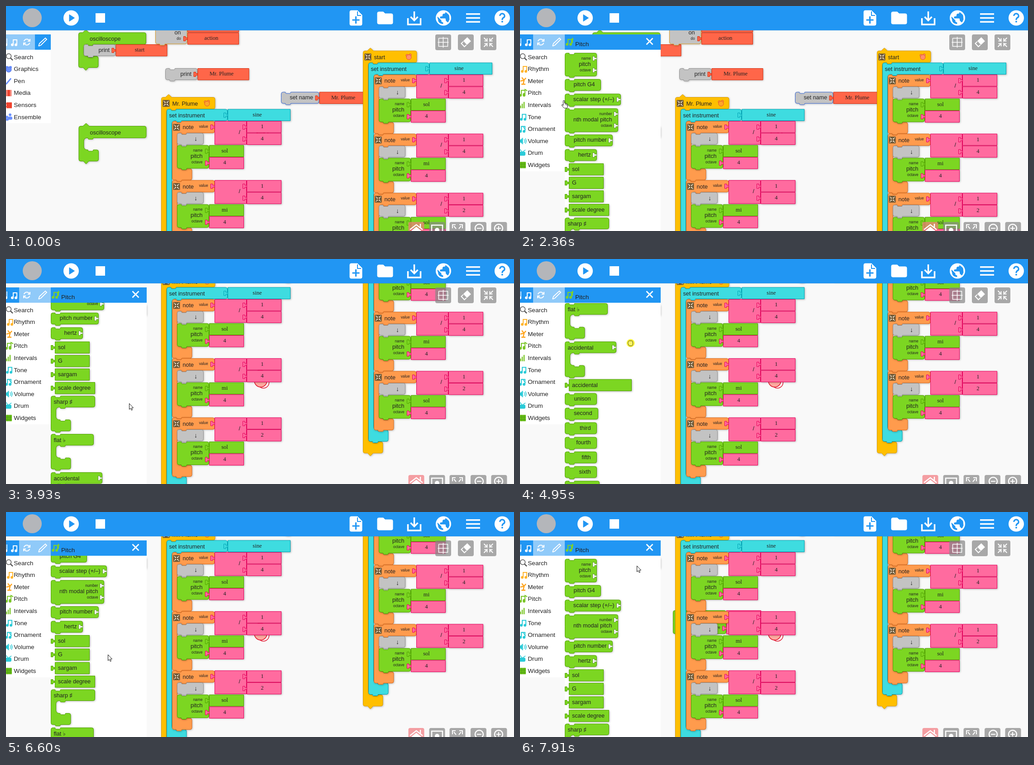
These frames come from a looping animation (1123 by 499 pixels, 7.99 s). An HTML page with a canvas:

```html
<!DOCTYPE html>
<html lang="en">
<head>
<meta charset="utf-8">
<title>Block music editor</title>
<style>
html, body { margin: 0; width: 100%; height: 100%; overflow: hidden; background: #f9f9f9; }
canvas { display: block; width: 1123px; height: 499px; }
</style>
</head>
<body>
<canvas id="stage" width="1123" height="499"></canvas>
<script>
const ctx = document.getElementById('stage').getContext('2d');
const LOOP = 7990, NAME = 'Mr. Plume';
const SANS = '"Liberation Sans", Arial, sans-serif', SERIF = '"Liberation Serif", Times, serif';
const BLUE = '#2196f3', PALE = '#90caf9';
const YELLOW = ['#ffbf00', '#d99c00'], CYAN = ['#3edce0', '#00a3b5'], ORANGE = ['#ff9b4d', '#d96a1c'],
  GREEN = ['#7cd622', '#4fa000'], PINK = ['#ff6b9f', '#e6005c'], RED = ['#ff6649', '#d92e0f'],
  GREY = ['#c3c3c3', '#919191'];

// [first change, last change, number of changes]
const BURSTS = [[230, 1010, 11], [1090, 1810, 10], [1890, 1890, 1], [2050, 2360, 5], [2990, 3060, 2],
  [3230, 3460, 4], [3610, 3930, 5], [4160, 4400, 4], [4630, 5420, 11], [5500, 6280, 11],
  [6350, 7050, 10], [7200, 7910, 10]];
const WORK_SCROLL = [[3153, 0], [3460, 166]];
const MENU_SCROLL = [[3530, 0], [3930, 166], [4080, 166], [4400, 332], [4630, 332], [4946, 456],
  [5100, 468], [5500, 397], [6280, 326], [6583, 76], [6800, 18], [7050, 0]];
const POINTER = [[230, 762, 484, 'arrow'], [500, 500, 330, 'arrow'], [800, 140, 170, 'arrow'],
  [1010, 33, 118, 'hand'], [1330, 15, 80, 'hand'], [1490, 15, 80, 'hand'], [1810, 16, 160, 'hand'],
  [1890, 15, 182, 'hand'], [2050, 17, 188, 'hand'], [2360, 95, 209, 'hand'], [2910, 95, 209, 'hand'],
  [3060, 326, 234, 'arrow'], [3460, 317, 234, 'arrow'], [3610, 314, 240, 'arrow'],
  [3930, 272, 320, 'arrow'], [4400, 272, 320, 'arrow'], [4630, 272, 310, 'fist'],
  [4946, 244, 186, 'fist'], [5100, 243, 174, 'fist'], [5500, 259, 245, 'fist'],
  [6280, 225, 316, 'arrow'], [7120, 225, 316, 'arrow'], [7357, 155, 256, 'fist'],
  [7673, 393, 247, 'arrow'], [7910, 258, 119, 'arrow']];
const TABS_AT = 1400, FLYOUT_AT = 2120, GRAB_AT = 7357, DROP_AT = 7670;

function heldTime(t) {
  const burst = BURSTS.filter(b => b[0] <= t).pop();
  if (!burst) return 0;
  const [start, end, count] = burst;
  if (count === 1) return start;
  const step = (end - start) / (count - 1);
  return start + Math.min(count - 1, Math.floor((t - start) / step + 1e-6)) * step;
}

function track(keys, t, column = 1) {
  const next = keys.findIndex(k => k[0] > t);
  if (next === 0) return keys[0][column];
  if (next < 0) return keys[keys.length - 1][column];
  const a = keys[next - 1], b = keys[next];
  return Math.round(a[column] + (b[column] - a[column]) * (t - a[0]) / (b[0] - a[0]));
}

function rect(x, y, w, h, fill) { ctx.fillStyle = fill; ctx.fillRect(x, y, w, h); }

function disc(x, y, r, fill, stroke) {
  ctx.beginPath();
  ctx.arc(x, y, r, 0, 7);
  if (fill) { ctx.fillStyle = fill; ctx.fill(); }
  if (stroke) { ctx.strokeStyle = stroke; ctx.stroke(); }
}

function roundBox(x, y, w, h, r, fill) {
  ctx.beginPath();
  ctx.roundRect(x, y, w, h, r);
  ctx.fillStyle = fill;
  ctx.fill();
}

function text(s, x, y, { size = 12.6, font = SANS, align = 'left', color = '#222' } = {}) {
  ctx.font = `${size}px ${font}`;
  ctx.textAlign = align;
  ctx.textBaseline = 'middle';
  ctx.fillStyle = color;
  ctx.fillText(s, x, y);
}

const small = (s, x, y) => text(s, x, y, { size: 8.3, align: 'right' });

// Lines in "x,y x,y" form; several strokes are separated by "|"
function lines(x, y, d, color = '#fff', width = 2) {
  ctx.strokeStyle = color;
  ctx.lineWidth = width;
  ctx.beginPath();
  for (const stroke of d.split('|'))
    stroke.split(' ').forEach((p, i) => {
      const [px, py] = p.split(',').map(Number);
      i ? ctx.lineTo(x + px, y + py) : ctx.moveTo(x + px, y + py);
    });
  ctx.stroke();
  ctx.lineWidth = 1;
}

// Polygon of [x, y, corner radius]
function shape(points, [fill, stroke], shadow = true) {
  const last = points[points.length - 1], n = points.length;
  ctx.beginPath();
  ctx.moveTo((last[0] + points[0][0]) / 2, (last[1] + points[0][1]) / 2);
  points.forEach(([x, y, r = 0], i) => {
    const [nx, ny] = points[(i + 1) % n];
    r ? ctx.arcTo(x, y, nx, ny, r) : ctx.lineTo(x, y);
  });
  ctx.closePath();
  ctx.save();
  if (shadow) { ctx.shadowColor = 'rgba(0,0,0,.3)'; ctx.shadowBlur = 4; ctx.shadowOffsetX = ctx.shadowOffsetY = 1; }
  ctx.fillStyle = fill;
  ctx.fill();
  ctx.restore();
  ctx.strokeStyle = stroke;
  ctx.stroke();
}

const topEdge = (x, y, hat) => hat
  ? [[x + 9, y], [x + 16, y - 6.5, 1], [x + 23, y]]
  : [[x + 9, y], [x + 10, y + 3, 1], [x + 20, y + 3, 1], [x + 21, y]];
const bottomEdge = (x, y, tip) => tip
  ? [[x + 22, y], [x + 16, y + 6.5, 1], [x + 10, y]]
  : [[x + 21, y], [x + 20, y + 3, 1], [x + 10, y + 3, 1], [x + 9, y]];

function slab(x, y, w, h, color) {
  shape([[x, y, 4], ...topEdge(x, y), [x + w, y, 4], [x + w, y + h, 4],
    ...bottomEdge(x, y + h), [x, y + h, 4]], color);
}

function clamp(x, y, w, inner, color, { hat = false, head = 26, foot = 25, bar = 11 } = {}) {
  const y1 = y + head, y2 = y1 + inner, y3 = y2 + foot, xi = x + bar;
  shape([[x, y, 4], ...topEdge(x, y, hat), [x + w, y, 4], [x + w, y1, 4],
    ...bottomEdge(xi, y1), [xi, y1, 7], [xi, y2, 7], ...topEdge(xi, y2),
    [x + 43.5, y2, 4], [x + 43.5, y3, 4], ...bottomEdge(x, y3, hat), [x, y3, 4]], color);
}

function plug(x, y, color) {
  shape([[x, y - 2], [x - 4.5, y - 2], [x - 4.5, y - 5], [x - 9, y - 5], [x - 9, y + 5],
    [x - 4.5, y + 5], [x - 4.5, y + 2], [x, y + 2]], color, false);
}

function value(x, y, w, color, label, h = 25.5) {
  plug(x, y + 13, color);
  shape([[x, y], [x + w, y], [x + w, y + h], [x, y + h]], color);
  if (label) text(label, x + w / 2 - 4, y + 12.5, { font: SERIF, align: 'center' });
}

function collapseMark(x, y) {
  rect(x, y, 15, 15, '#6b5533');
  lines(x + 7.5, y + 7.5, '-5.5,-5.5 -1.5,-1.5|5.5,-5.5 1.5,-1.5|-5.5,5.5 -1.5,1.5|5.5,5.5 1.5,1.5', '#f4e8d4', 1.3);
  lines(x + 7.5, y + 7.5, '-1.5,-4 -1.5,-1.5 -4,-1.5|1.5,-4 1.5,-1.5 4,-1.5|-1.5,4 -1.5,1.5 -4,1.5|1.5,4 1.5,1.5 4,1.5', '#f4e8d4', .8);
}

function note(x, y, name, beat) {
  clamp(x, y, 93.5, 79.5, ORANGE);
  collapseMark(x + 2, y + 6);
  text('note', x + 23, y + 14.5);
  small('value', x + 79, y + 12);
  value(x + 94, y, 70, PINK, '', 51.5);
  text('/', x + 147, y + 25);
  value(x + 165, y, 76, PINK, '1');
  value(x + 165, y + 26.5, 76, PINK, beat);
  slab(x + 11, y + 26.5, 58, 25, GREY);
  text('↓', x + 52, y + 40, { size: 14, align: 'center' });
  slab(x + 11, y + 53.5, 70, 51, GREEN);
  small('name', x + 67, y + 65);
  text('pitch', x + 67, y + 78, { align: 'right' });
  small('octave', x + 67, y + 91);
  value(x + 82, y + 53.5, 76, GREEN, name);
  value(x + 82, y + 80, 76, PINK, '4');
}

function critter(x, y, color) {
  ctx.lineWidth = 1;
  disc(x - 4, y - 3, 2.5, color, '#e2502c');
  disc(x + 3, y - 4, 2.5, color, '#e2502c');
  disc(x, y + 1, 5.5, color, '#e2502c');
}

function stack(x, y, title, color) {
  clamp(x, y, 118.5, 446, YELLOW, { hat: true });
  collapseMark(x + 3, y + 6);
  text(title, x + 24, y + 15);
  critter(x + 101, y + 13, color);
  clamp(x + 12, y + 26.5, 134, 394, CYAN, { head: 25.5 });
  text('set instrument', x + 17, y + 41);
  value(x + 147, y + 26.5, 138, CYAN, 'sine');
  ['sol', 'mi', 'sol'].forEach((name, i) => note(x + 24, y + 53 + 131.2 * i, name, i < 2 ? '4' : '2'));
}

function scope(x, y) {
  clamp(x, y, 149, 26.5, GREEN, { hat: true });
  text('oscilloscope', x + 24.5, y + 15);
}

function labelled(x, y, w, label, arg, argW, stroke) {
  slab(x, y, w, 25, [GREY[0], stroke || GREY[1]]);
  text(label, x + w - 13, y + 13, { align: 'right' });
  value(x + w + 1, y, argW, RED, arg);
}

function modalPitch(x, y) {
  slab(x, y, 117, 51.5, GREEN);
  small('number', x + 104, y + 12);
  text('nth modal pitch', x + 104, y + 25, { align: 'right' });
  small('octave', x + 104, y + 38);
}

function workspace(scroll, dropped) {
  rect(0, 0, 1123, 499, '#f9f9f9');
  ctx.lineWidth = 1.5;
  disc(562, 256, 10, '#fbb', '#e01830');
  disc(569, 274, 12.5, '#fff', '#e01830');
  disc(563, 270, 14, '#ffaaa0', '#e01830');
  ctx.lineWidth = 1;
  if (dropped) {
    modalPitch(338.5, 218.5);
    value(456.5, 218.5, 76, PINK, '7');
    value(456.5, 245, 76, PINK, '4');
  }
  ctx.save();
  ctx.translate(.5, .5 - scroll);
  scope(160, 58.5);
  labelled(171.5, 85, 70, 'print', 'start', 113);
  scope(160.5, 266);
  slab(330, 30, 69.5, 53.5, [GREY[0], '#d99b22']);
  text('on', 386, 59, { align: 'right' });
  small('do', 386, 72);
  value(401, 32, 113, RED);
  value(401, 59, 113, RED, 'action');
  labelled(352, 138, 70.5, 'print', NAME, 113);
  labelled(608, 190.5, 83.5, 'set name', NAME, 113, '#3566d6');
  stack(343, 202, NAME, '#ffa62b');
  stack(789, 99, 'start', '#ff8f6b');
  ctx.restore();
}

function buttons() {
  const grey = 'rgba(135,135,135,.7)';
  for (const x of [949, 999, 1049]) roundBox(x, 63, 35, 35, 4, grey);
  lines(966.5, 80.5, '-10,-9 10,-9 10,9 -10,9 -10,-9|0,-12 0,12|-12,0 12,0', '#fff', 1.5);
  ctx.save();
  ctx.translate(1016.5, 80.5);
  ctx.rotate(-.75);
  rect(-2, -6, 12, 12, '#fff');
  lines(0, 0, '-3,-5 -9,-5 -9,5 -3,5', '#fff', 2);
  ctx.restore();
  lines(1066.5, 80.5, '-10,-10 -3,-3 -3,-9|-3,-3 -9,-3|10,-10 3,-3 3,-9|3,-3 9,-3|-10,10 -3,3 -3,9|-3,3 -9,3|10,10 3,3 3,9|3,3 9,3');
  [889.5, 935.5, 980.5, 1027, 1072.5].forEach((x, i) =>
    roundBox(x, 479, 35, 35, 4, i ? grey : 'rgba(243,120,126,.7)'));
  lines(907, 484, '-14,12 0,1 14,12|9,-1 9,7', '#fff', 2.5);
  shape([[907, 490], [917, 498], [917, 510], [897, 510], [897, 498]], ['#fff', '#fff'], false);
  lines(953, 486, '-12,13 -12,0 12,0 12,13', '#fff', 2.5);
  disc(953, 497, 5, '#fff');
  lines(998, 485, '-11,8 -11,0 -4,0|11,8 11,0 4,0|-8,3 -3,9|8,3 3,9');
  for (const x of [1046, 1089]) {
    ctx.lineWidth = 2.5;
    disc(x, 493, 9, null, '#fff');
    lines(x, 493, x < 1060 ? '-5,0 5,0' : '-5,0 5,0|0,-5 0,5');
  }
}

function quaver(x, y, color, pair = true) {
  lines(x, y, pair ? '0,5 0,-6 8,-6 8,5' : '0,5 0,-6 5,-3', color, 2);
  disc(x - 2, y + 5, 3, color);
  if (pair) disc(x + 6, y + 5, 3, color);
}

function drawIcon(kind, y) {
  const mint = '#2ccbd8', leaf = '#7cc62a', sky = '#6c92ff', coral = '#f0432e', amber = '#ffa41c';
  switch (kind) {
    case 'Search':
      ctx.lineWidth = 1.5;
      disc(6, y - 2, 5.5, null, '#555');
      lines(10, y + 2, '0,0 5,5', '#555', 2.5);
      break;
    case 'Rhythm': quaver(7, y, '#ffb52e'); break;
    case 'Meter': lines(4, y, '0,-8 5,-2 3,7|-3,0 5,-2 9,-7|-1,7 8,7', amber, 2.5); break;
    case 'Pitch': quaver(3, y, leaf); quaver(11, y - 2, leaf, false); break;
    case 'Intervals': lines(1, y, '0,7 0,1|4,7 4,-3|8,7 8,-7', leaf, 2.5); break;
    case 'Tone': quaver(5, y, mint); break;
    case 'Ornament': quaver(3, y, mint); lines(8, y, '-3,-7 4,1 -2,6', mint, 1.5); break;
    case 'Volume':
      shape([[-2, y - 3], [2, y - 3], [6, y - 7], [6, y + 7], [2, y + 3], [-2, y + 3]], [mint, mint], false);
      lines(9, y, '0,-4 2,0 0,4|3,-6 5,0 3,6', mint, 1.5);
      break;
    case 'Drum': roundBox(-2, y - 3, 14, 9, 3, mint); lines(0, y, '0,-8 5,-2 12,-7', mint, 1.5); break;
    case 'Widgets': rect(0, y - 7, 13, 14, '#6abf18'); lines(0, y, '4,-7 4,7|9,-7 9,7|0,-2 13,-2|0,3 13,3', '#4b9d10', 1); break;
    case 'Graphics': disc(2, y - 4, 3, sky); disc(10, y - 4, 3, sky); disc(6, y + 1, 6, sky, '#4a6be0'); break;
    case 'Pen': lines(0, y, '0,7 11,-6', sky, 3); break;
    case 'Media': rect(0, y - 7, 12, 14, coral); lines(0, y, '2,-7 2,7|10,-7 10,7', '#fff', 1); break;
    case 'Sensors': rect(1, y - 6, 12, 13, coral); lines(0, y, '-2,-3 1,-3|-2,3 1,3', coral, 2); break;
    case 'Ensemble': disc(9, y - 5, 3, sky); roundBox(4, y - 1, 10, 7, 3, sky); disc(2, y, 3, sky); roundBox(-2, y + 3, 8, 5, 2, sky); break;
  }
}

function palette(music) {
  const items = (music
    ? 'Search Rhythm Meter Pitch Intervals Tone Ornament Volume Drum Widgets'
    : 'Search Graphics Pen Media Sensors Ensemble').split(' ');
  rect(0, 63, 99, 34 + items.length * 26.7 + 2.5, '#fff');
  rect(0, 63, 99, 34, PALE);
  music ? rect(0, 63, 29, 34, BLUE) : rect(64, 63, 35, 34, BLUE);
  lines(2, 80, '0,-8 0,6', '#fff', 1.5);
  disc(0, 86, 3, '#fff');
  quaver(16, 81, '#fff');
  ctx.lineWidth = 2;
  ctx.strokeStyle = '#fff';
  for (const a of [3.4, .26]) {
    ctx.beginPath();
    ctx.arc(46, 80, 6.5, a, a + 2.4);
    ctx.stroke();
  }
  lines(46, 80, '7,-7 7,-2 2,-2|-7,7 -7,2 -2,2');
  lines(81, 80, '-9,9 -7,3 6,-9 9,-6 -4,7 -9,9', '#fff', 1.8);
  items.forEach((name, i) => {
    const y = 113.3 + 26.6 * i;
    drawIcon(name, y);
    text(name, 17.3, y + .5, { size: 13.6 });
  });
}

function flyout(scroll) {
  const slot = (x, y) => plug(x, y, ['#f4f4f4', '#5f9a2a']);
  const right = (s, x, y) => text(s, x, y, { align: 'right' });
  rect(99, 97, 212, 402, '#fff');
  ctx.save();
  ctx.beginPath();
  ctx.rect(99, 97, 212, 402);
  ctx.clip();
  ctx.translate(.5, .5 - scroll);

  slab(99, 104, 70, 51, GREEN);
  small('name', 156, 116);
  right('pitch', 156, 129);
  small('octave', 156, 142);
  slot(169, 116); slot(169, 142);
  const simple = (label, y, w, pad, hole) => {
    slab(99, y - 12.5, w, 25, GREEN);
    right(label, 99 + w - pad, y);
    if (hole) slot(99 + w, y);
  };
  simple('pitch G4', 174.5, 79, 13);
  simple('scalar step (+/–)', 207, 123, 14, true);
  modalPitch(99, 227);
  slot(216, 239); slot(216, 265);
  simple('pitch number', 297.5, 105, 13, true);
  simple('hertz', 330, 70, 13, true);

  const boxed = (label, y, edge) => {
    value(108, y - 13.5, edge - 108, GREEN);
    text(label, 114.5, y);
  };
  ['sol', 'G', 'sargam', 'scale degree'].forEach((s, i) => boxed(s, 362.5 + 30 * i, i < 3 ? 184 : 196));

  [['sharp ♯', 469.5, 97], ['flat ♭', 554, 94], ['accidental', 639, 113]].forEach(([s, y, w]) => {
    clamp(99, y, w, 28, GREEN, { head: 24.5 });
    text(s, 105, y + 14);
  });
  slot(212, 651.5);
  boxed('accidental', 736, 246);
  'unison second third fourth fifth sixth seventh octave'.split(' ').forEach((s, i) =>
    simple(s, 766 + 32.4 * i, [70, 73, 70, 70, 70, 70, 76, 73][i], 13));
  ctx.restore();

  rect(99, 63, 212, 34, BLUE);
  quaver(106, 80, '#7fd02a');
  lines(116, 80, '0,2 0,-8 2,-6', '#7fd02a', 2);
  text('Pitch', 122, 85, { size: 13.6 });
  lines(286.5, 78.5, '-7,-7 7,7|7,-7 -7,7', '#fff', 2.8);
}

function header() {
  rect(0, 54, 1123, 1, 'rgba(0,0,0,.06)');
  rect(0, 0, 1123, 54, BLUE);
  disc(58, 26, 21, '#b4b6ba');
  disc(144, 26.5, 17, '#fff');
  shape([[140, 19], [151.5, 26.5], [140, 34]], [BLUE, BLUE], false);
  rect(198, 16, 21, 21, '#fff');
  shape([[760, 10, 3], [777, 10], [787, 20], [787, 43, 3], [760, 43, 3]], ['#fff', '#fff'], false);
  lines(773.5, 31, '0,-8 0,8|-8,0 8,0', BLUE, 3.2);
  lines(777, 12, '0,0 0,9 8,9', BLUE, 2);
  shape([[821, 13, 3], [834, 13], [838, 17], [855, 17, 3], [855, 40, 3], [821, 40, 3]], ['#fff', '#fff'], false);
  lines(902.5, 27, '-14,0 -14,14 14,14 14,0|0,-15 0,4', '#fff', 3.5);
  lines(902.5, 27, '-8,-3 0,5 8,-3', '#fff', 3.5);
  disc(967, 26.5, 17, '#fff');
  shape([[954, 24], [962, 32], [962, 35, 1], [966, 37], [966, 40, 1], [957, 37, 6]], [BLUE, BLUE], false);
  shape([[972, 14], [979, 20, 4], [980, 30, 3], [977, 36], [973, 33, 2], [972, 27, 2], [960, 27], [960, 24],
    [965, 23, 1], [966, 18], [971, 17, 2]], [BLUE, BLUE], false);
  for (const y of [17.8, 26.5, 35.2]) rect(1017, y - 1.7, 31, 3.4, '#fff');
  disc(1097, 26.5, 17, '#fff');
  ctx.lineWidth = 3.3;
  ctx.strokeStyle = BLUE;
  ctx.beginPath();
  ctx.arc(1097, 22, 5.2, Math.PI, Math.PI * 2.2);
  ctx.quadraticCurveTo(1097, 27, 1097, 31);
  ctx.stroke();
  rect(1095.3, 33, 3.4, 3.4, BLUE);
  ctx.lineWidth = 1;
}

function pointer(x, y, kind) {
  const ink = ['#fff', '#111'], at = pts => pts.map(([px, py, r]) => [x + px, y + py, r]);
  if (kind === 'arrow')
    shape(at([[0, 0], [0, 13], [3, 10.5], [5, 15], [7, 14], [5.2, 9.8], [9, 9.5]]), ink, false);
  else if (kind === 'hand') {
    shape(at([[0, 0, 1.4], [3, 0, 1.4], [3, 6], [8, 7, 1], [10, 9, 2], [9, 17, 2], [2, 17, 2], [-4, 10, 1.5], [-2, 9, 1], [0, 11]]), ink, false);
    lines(x, y, '5.5,7 5.5,10|8,8 8,11', '#111', 1);
  } else {
    disc(x, y, 9, '#f7f03a');
    shape(at([[-4, -5, 2], [4, -5, 2], [5, 2, 2], [3, 6, 1], [-3, 6, 1], [-6, 0, 2]]), ['#faf56a', '#55500a'], false);
  }
}

function draw(t) {
  workspace(track(WORK_SCROLL, t), t >= DROP_AT);
  buttons();
  palette(t >= TABS_AT);
  if (t >= FLYOUT_AT) flyout(track(MENU_SCROLL, t));
  header();
  if (t < POINTER[0][0]) return;
  const x = track(POINTER, t), y = track(POINTER, t, 2);
  if (t >= GRAB_AT && t < DROP_AT) modalPitch(x - 55.5, y - 28.5);
  pointer(x + .5, y + .5, POINTER.filter(k => k[0] <= t + .5).pop()[3]);
}

function tick() {
  draw(heldTime(performance.now() % LOOP));
  requestAnimationFrame(tick);
}
tick();
</script>
</body>
</html>
```
